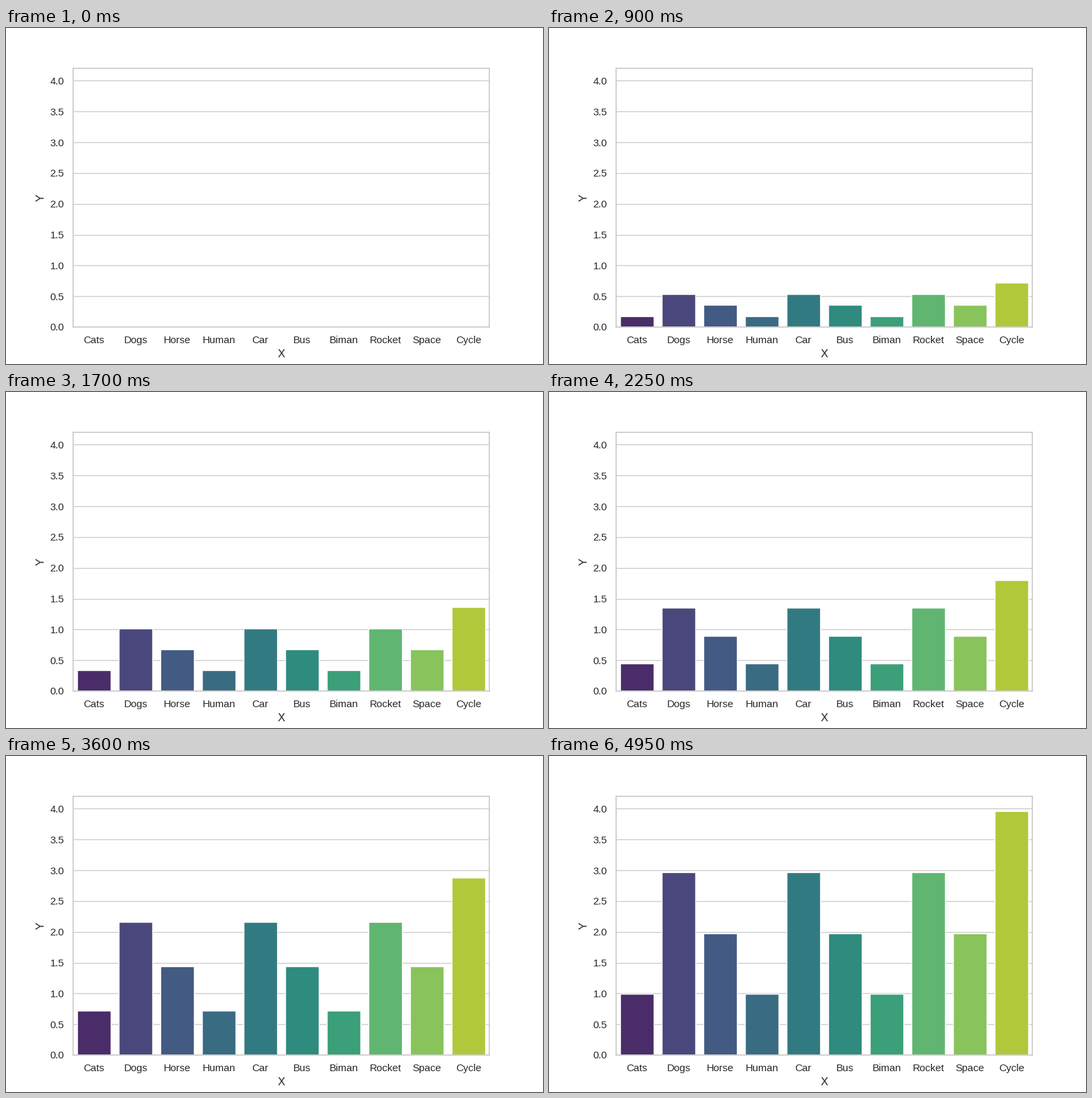
A matplotlib script that plays this animation: 800 by 500 pixels, repeating every 5 s.

```python
import colorsys

import matplotlib.pyplot as plt
import numpy as np
from matplotlib.animation import FuncAnimation

FRAMES = 100
INTERVAL = 50
LABELS = ["Cats", "Dogs", "Horse", "Human", "Car",
          "Bus", "Biman", "Rocket", "Space", "Cycle"]
VALUES = np.array([1, 3, 2, 1, 3, 2, 1, 3, 2, 4])
INK = "0.15"
RULE = "0.8"

plt.rcParams.update({
    "font.family": "Liberation Sans",
    "text.color": INK,
    "axes.labelcolor": INK,
    "axes.edgecolor": RULE,
    "axes.linewidth": 1.25,
    "axes.labelsize": 12,
    "axes.axisbelow": True,
    "grid.color": RULE,
    "grid.linewidth": 1,
    "lines.solid_capstyle": "round",
})


def desaturate(rgb, amount=0.75):
    h, l, s = colorsys.rgb_to_hls(*rgb)
    return colorsys.hls_to_rgb(h, l, s * amount)


def bar_colors(n):
    samples = plt.get_cmap("viridis")(np.linspace(0, 1, n + 2)[1:-1])
    return [desaturate(c[:3]) for c in samples]


fig, ax = plt.subplots(figsize=(8, 5), dpi=100)
fig.subplots_adjust(left=0.125, right=0.9, bottom=0.11, top=0.88)

n = len(LABELS)
bars = ax.bar(np.arange(n), np.zeros(n), width=0.8, color=bar_colors(n),
              edgecolor="white", linewidth=1)

ax.set_xlim(-0.5, n - 0.5)
ax.set_ylim(0, 4.2)
ax.set_xticks(np.arange(n), LABELS)
ax.set_yticks(np.arange(0, 4.1, 0.5))
ax.yaxis.set_major_formatter("{x:.1f}")
# Hidden ticks keep their length so the labels stay offset from the axes.
ax.tick_params(length=6, pad=3.5, left=False, bottom=False,
               labelsize=11, labelcolor=INK)
ax.grid(axis="y")
ax.set_xlabel("X")
ax.set_ylabel("Y")


def update(frame):
    for bar, value in zip(bars, VALUES):
        bar.set_height(value * frame / FRAMES)
    return list(bars)


anim = FuncAnimation(fig, update, frames=FRAMES, interval=INTERVAL,
                     repeat=True, repeat_delay=0)

plt.show()
```
